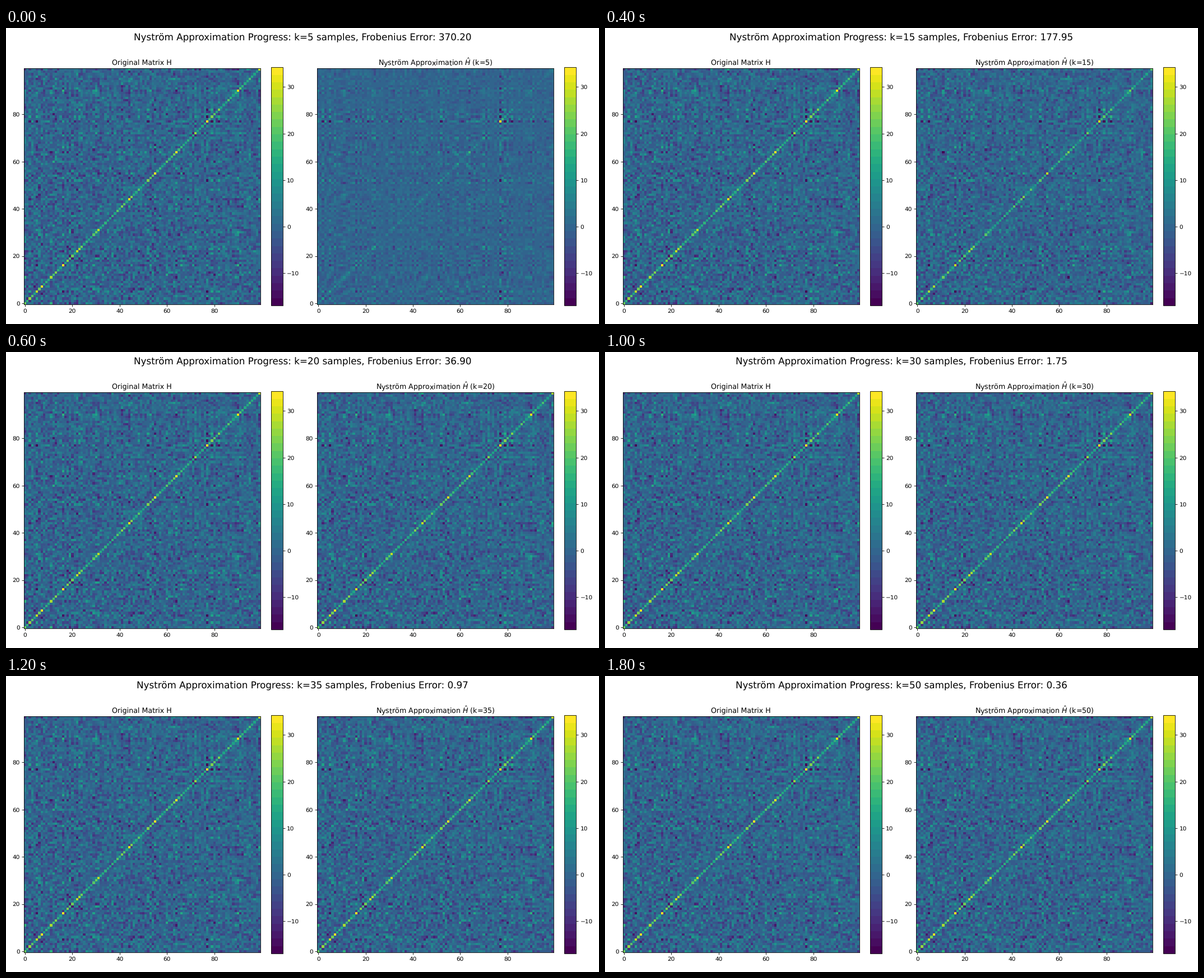
Recreate the animation shown at these times as a matplotlib script. Size 1058 px wide and 529 px high, loop 2 s.

```python
import numpy as np
import matplotlib.pyplot as plt
from matplotlib.animation import FuncAnimation

W, H = 1058, 529
N, RANK = 100, 20
RIDGE = 0.024
VMIN, VMAX = -16.9, 34.2
STEP_MS = 200

# Error shown in the heading, one per step of five samples
ERRORS = [370.20, 275.73, 177.95, 36.90, 6.00, 1.75, 0.97, 0.61, 0.47, 0.36]
PEAKS = [7, 16, 44, 55, 64, 77, 90]

plt.rcParams["text.hinting"] = "none"


def make_matrix(rng):
    """Random low-rank Gram matrix with a bright, uneven diagonal."""
    diag = 12 + 18 * rng.random(N) ** 2
    diag[PEAKS] = rng.uniform(30, 34, len(PEAKS))
    a = rng.standard_normal((N, RANK))
    a *= np.sqrt(diag / (a ** 2).sum(axis=1))[:, None]
    return a @ a.T + RIDGE * np.eye(N)


def nystrom(m, idx):
    c = m[:, idx]
    return c @ np.linalg.solve(c[idx], c.T)


rng = np.random.default_rng(42)
matrix = make_matrix(rng)
approximations = [nystrom(matrix, rng.choice(N, 5 * (n + 1), replace=False))
                  for n in range(len(ERRORS))]

fig = plt.figure(figsize=(14, 7), dpi=H / 7, facecolor="white")
cmap = plt.get_cmap("viridis", 32)


def axes_at(x, top, w, h):
    return fig.add_axes([x / W, 1 - (top + h) / H, w / W, h / H])


def panel(x, data):
    """Heat map with its colour bar; x is the left edge in pixels."""
    ax = axes_at(x, 72.1, 421.9, 421.9)
    im = ax.imshow(data, cmap=cmap, vmin=VMIN, vmax=VMAX, origin="lower",
                   interpolation="nearest", aspect="auto")
    ax.set_xticks(range(0, N, 20))
    ax.set_yticks(range(0, N, 20))
    fig.colorbar(im, cax=axes_at(x + 440.6, 70.3, 21.3, 425.6),
                 ticks=range(-10, 40, 10))
    return ax, im


left, _ = panel(31.9, matrix)
left.set_title("Original Matrix H", fontsize=12)
right, image = panel(555.2, approximations[0])
right_title = right.set_title("", fontsize=12)
heading = fig.suptitle("", fontsize=16, y=0.982)


def update(n):
    k = 5 * (n + 1)
    image.set_data(approximations[n])
    right_title.set_text(rf"Nyström Approximation $\hat{{H}}$ (k={k})")
    heading.set_text(f"Nyström Approximation Progress: k={k} samples, "
                     f"Frobenius Error: {ERRORS[n]:.2f}")
    return image, right_title, heading


anim = FuncAnimation(fig, update, frames=len(ERRORS), interval=STEP_MS,
                     repeat=True, repeat_delay=0, blit=False)
plt.show()
```
